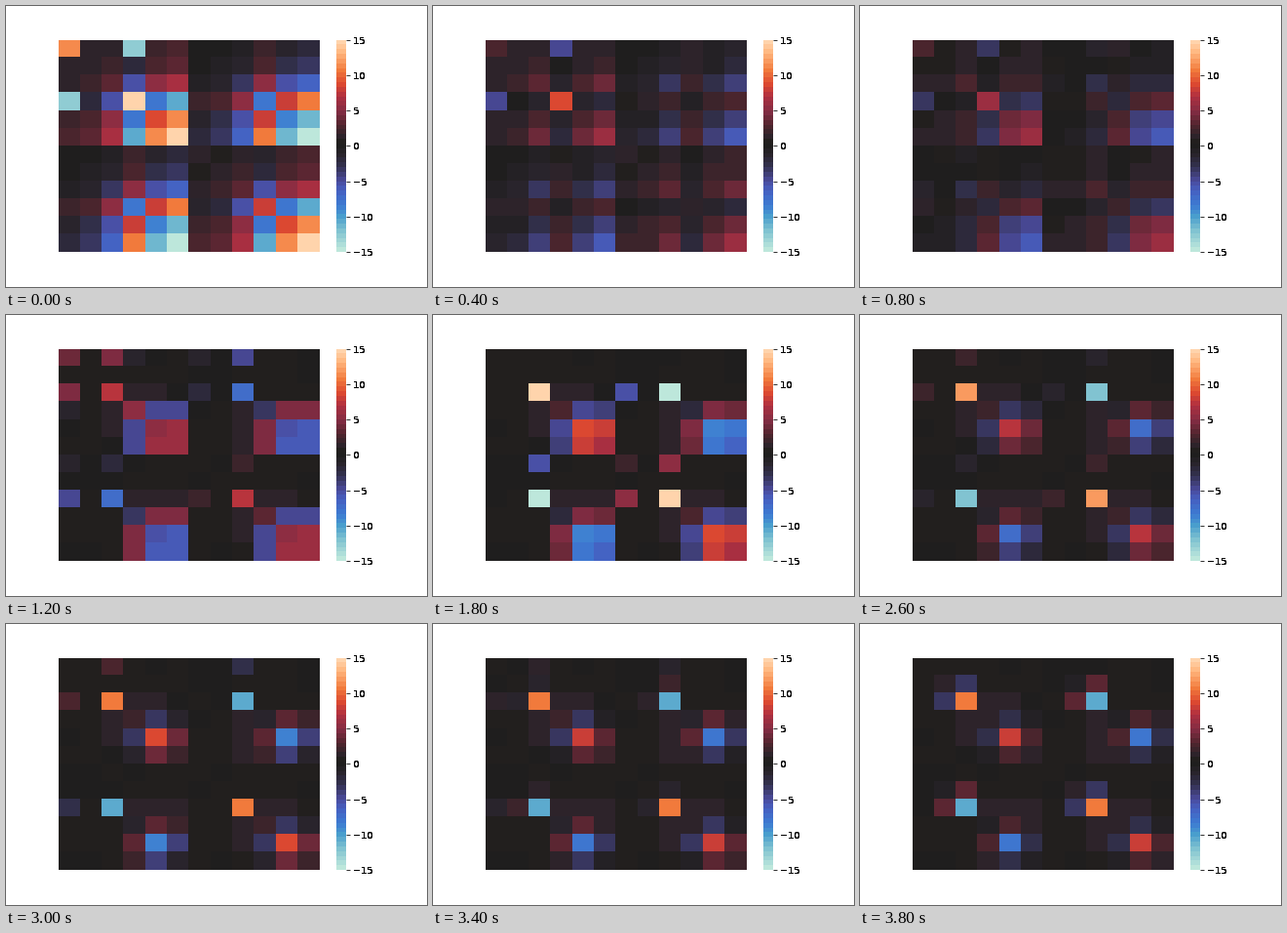
A matplotlib script that plays this animation: 432x288 px, repeating every 4 s.

```python
import numpy as np
import matplotlib.pyplot as plt
from matplotlib.animation import FuncAnimation
from matplotlib.colors import LinearSegmentedColormap

W, H, DPI = 432, 288, 72
FRAMES, STEP = 20, 200
N, LIMIT = 12, 15
LEFT, RIGHT, TOP, BOTTOM = 54, 321.84, 34.56, 252

plt.rcParams.update({
    "font.family": "DejaVu Sans",
    "font.size": 10,
    "text.hinting": "default",
    "text.hinting_factor": 1,
})

STOPS = [
    (-15, "#bde7db"), (-12, "#7bbfd0"), (-10.3, "#4a9fcd"), (-8.5, "#3c7ad2"),
    (-6.5, "#465fc0"), (-5, "#4a4a9b"), (-3, "#33314f"), (-1.3, "#29232b"),
    (0, "#1f1e1e"), (0.6, "#211e1c"), (1.3, "#2c232a"), (3, "#50252d"),
    (5, "#842c43"), (7.2, "#b03040"), (9, "#de4a30"), (11, "#f27c3d"),
    (13.5, "#ffb780"), (15, "#ffd4ac"),
]
CMAP = LinearSegmentedColormap.from_list(
    "ice_fire", [((v + LIMIT) / (2 * LIMIT), c) for v, c in STOPS], N=45)

rng = np.random.default_rng(5)
GRAIN = np.triu(rng.uniform(0.3, 1.8, (N, N)))
GRAIN += np.triu(GRAIN, 1).T
QUIET = np.isin(np.arange(N), (0, 1, 6, 7))


def track(t, *keys):
    """Piecewise linear value through (time, value) points."""
    return np.interp(t, *zip(*keys))


def mode_vectors(t):
    """The three vectors whose outer products add up to the matrix."""
    early = track(t, (2, 1), (6, 0))

    start = np.zeros(N)
    start[0] = track(t, (0, 3.3), (2, 1.6), (6, 1), (9, 0))
    start[3] = track(t, (0, -3.4), (2, -2.75), (6, -1.3), (9, 0))

    half = np.zeros(6)
    half[:3] = early * np.array([0.6, 0.85, 1.8])
    half[3] = track(t, (0, -2.8), (2, -1), (6, -1.9), (9, -1.5), (19, -1.05))
    half[4] = track(t, (0, 2.9), (2, 1.6), (6, 2.35), (9, 2.95),
                    (11, 2.4), (15, 2.95), (19, 2.8))
    half[5] = track(t, (0, 3.85), (2, 2.4), (9, 2.6), (11, 1.65), (19, 1))
    pair = np.concatenate([half, -half])

    spot = np.zeros(N)
    spot[2] = track(t, (2, 0), (6, 2.65), (9, 3.87), (15, 3.28))
    spot[1] = track(t, (15, 0), (19, -0.95))
    spot[6:] = -spot[:6]
    spot[0] = track(t, (2, 0), (6, 1.7), (9, 0), (11, 0), (15, 0.9), (19, 0))
    spot[6] = -track(t, (2, 0), (9, 1.35), (11, 1), (15, 0))
    return early, (start, pair, spot)


def matrix(t):
    early, modes = mode_vectors(t)
    m = sum(np.outer(v, v) for v in modes)
    damp = np.where(QUIET, 0.5 + 0.4 * early, 1)
    return m + GRAIN * np.outer(damp, damp) * np.exp(-np.abs(m))


def cell_edges(a, b):
    """Whole-pixel cell borders between a and b."""
    edges = np.floor(np.linspace(a, b, N + 1))
    edges[[0, -1]] = np.round([a, b])
    return edges


fig = plt.figure(figsize=(W / DPI, H / DPI), dpi=DPI, facecolor="white")
shade = dict(cmap=CMAP, vmin=-LIMIT, vmax=LIMIT, antialiased=False)

stage = fig.add_axes([0, 0, 1, 1])
mesh = stage.pcolormesh(cell_edges(LEFT, RIGHT), cell_edges(TOP, BOTTOM),
                        matrix(0), **shade)
stage.set(xlim=(0, W), ylim=(H, 0))
stage.axis("off")

bar = fig.add_axes([338.58 / W, 1 - BOTTOM / H, 10.87 / W, (BOTTOM - TOP) / H])
levels = np.linspace(-LIMIT, LIMIT, CMAP.N + 1)
bar.pcolormesh([0, 1], levels, (levels[:-1, None] + levels[1:, None]) / 2,
               **shade)
ticks = range(-LIMIT, LIMIT + 1, 5)
bar.set(xlim=(0, 1), ylim=(-LIMIT, LIMIT), xticks=[], yticks=ticks)
bar.spines[:].set_visible(False)
bar.yaxis.tick_right()
bar.tick_params(axis="y", length=3.5, width=0.8, labelright=False)
for v in ticks:
    # Stacked copies harden the soft glyph edges.
    for _ in range(5):
        bar.annotate(str(v).replace("-", "\u2212"), (1, v), xytext=(7, 0),
                     textcoords="offset points", va="center_baseline",
                     annotation_clip=False)


def update(n):
    mesh.set_array(matrix(n % FRAMES))
    return [mesh]


anim = FuncAnimation(fig, update, frames=FRAMES, interval=STEP,
                     repeat=True, repeat_delay=0, blit=False)
plt.show()
```
